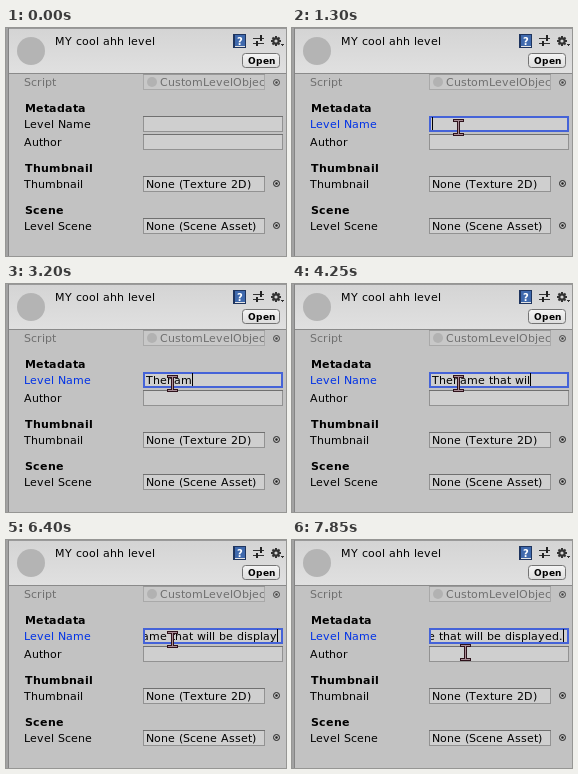
These frames come from a looping animation (280x228 px, 8000 ms). An HTML page with a canvas:

```html
<!DOCTYPE html>
<html lang="en">
<head>
<meta charset="utf-8">
<title>Level inspector</title>
<style>
html, body { margin: 0; width: 100%; height: 100%; overflow: hidden; background: #c2c2c2; }
canvas { display: block; width: 280px; height: 228px; }
</style>
</head>
<body>
<canvas id="stage" width="280" height="228"></canvas>
<script>
const ctx = document.getElementById('stage').getContext('2d');
const LOOP = 8000;
const FOCUS_AT = 1300;
const FAMILY = '"DejaVu Sans", sans-serif';
const FONT = '11px ' + FAMILY;
const BOLD = 'bold ' + FONT;
const LABEL_X = 18;

// Keystrokes: time, characters ("<" is backspace)
const KEYS = [
  [1950, 'T'], [2100, 'h'], [2250, 'e'], [2400, ' '], [2850, '<'],
  [3000, 'n'], [3100, 'a'], [3200, 'm'], [3300, 'e'], [3350, ' '],
  [3550, 't'], [3600, 'h'], [3750, 'a'], [3850, 't'], [3950, ' '],
  [4000, 'w'], [4100, 'i'], [4250, 'l'], [4400, 'l'], [4500, ' '],
  [4650, 'b'], [4800, 'e'], [4950, ' '], [5200, 'd'], [5300, 'i'],
  [5350, 's'], [5500, 'p'], [5600, 'la'], [6400, 'y'], [6600, 'e'],
  [6800, 'd'], [7000, '.']
];

// Pointer: time, x, y
const MOVES = [
  [350, 33, 105], [400, 52, 103], [450, 80, 97], [500, 108, 90],
  [550, 130, 85], [650, 150, 95], [700, 162, 102], [850, 163, 96],
  [950, 166, 99], [7150, 166, 106], [7200, 166, 123], [7250, 166, 136],
  [7300, 166, 151], [7350, 158, 209], [7400, 149, 195],
  [7700, 160, 172], [7750, 172, 148], [7800, 173, 126], [7850, 173, 112]
];

function rect(x, y, w, h, color) {
  ctx.fillStyle = color;
  ctx.fillRect(x, y, w, h);
}

function disc(x, y, r, color) {
  ctx.fillStyle = color;
  ctx.beginPath();
  ctx.arc(x, y, r, 0, 7);
  ctx.fill();
}

function shade(top, bottom, from, to) {
  const g = ctx.createLinearGradient(0, top, 0, bottom);
  g.addColorStop(0, from);
  g.addColorStop(1, to);
  return g;
}

// Glyph advances snap to whole pixels
const advance = ch => Math.round(ctx.measureText(ch).width + 0.1);

function textWidth(text) {
  let w = 0;
  for (const ch of text) w += advance(ch);
  return w;
}

function label(text, x, y, color = '#000', font = FONT) {
  ctx.font = font;
  ctx.fillStyle = color;
  for (const ch of text) {
    ctx.fillText(ch, x, y);
    x += advance(ch);
  }
}

function clipped(x, y, w, h, draw) {
  ctx.save();
  ctx.beginPath();
  ctx.rect(x, y, w, h);
  ctx.clip();
  draw();
  ctx.restore();
}

function field(x, y, w, fill = '#cfcfcf', edge = '#929292', top = '#707070') {
  rect(x, y, w, 16, edge);
  rect(x, y, w, 1, top);
  rect(x + 1, y + 1, w - 2, 14, fill);
}

function picker(y, color = '#222') {
  ctx.strokeStyle = color;
  ctx.lineWidth = 1;
  ctx.beginPath();
  ctx.arc(270.5, y, 3, 0, 7);
  ctx.stroke();
  disc(270.5, y, 1.2, color);
}

function helpIcon() {
  rect(227, 6, 13, 14, '#1f355f');
  rect(229, 7, 10, 11, '#3f69ad');
  rect(229, 18, 10, 1, '#e4e4e4');
  label('?', 231, 17, '#fff', 'bold 10px ' + FAMILY);
}

function sliderIcon() {
  rect(247, 10, 11, 1, '#333');
  rect(247, 15, 11, 1, '#333');
  rect(254, 7, 2, 6, '#222');
  rect(250, 13, 2, 5, '#222');
}

function gearIcon() {
  ctx.save();
  ctx.translate(270, 13);
  for (let i = 0; i < 4; i++) {
    rect(-1, -5, 2, 10, '#333');
    ctx.rotate(Math.PI / 4);
  }
  ctx.restore();
  disc(270, 13, 3.7, '#333');
  disc(270, 13, 1.6, '#d6d6d6');
  rect(275, 16, 3, 1, '#333');
  rect(276, 17, 1, 1, '#333');
}

function openButton() {
  ctx.beginPath();
  ctx.roundRect(236.5, 25.5, 37, 14, 3);
  ctx.fillStyle = shade(26, 39, '#f4f4f4', '#dedede');
  ctx.fill();
  ctx.strokeStyle = '#747474';
  ctx.lineWidth = 1;
  ctx.stroke();
  label('Open', 242, 36, '#000', 'bold 9px ' + FAMILY);
}

function header() {
  rect(0, 0, 280, 45, shade(0, 45, '#d4d4d4', '#e0e0e0'));
  rect(0, 0, 280, 1, '#9a9a9a');
  rect(0, 45, 280, 1, '#8a8a8a');
  disc(25, 23, 14, '#b4b4b4');
  label('MY cool ahh level', 49, 17);
  helpIcon();
  sliderIcon();
  gearIcon();
  openButton();
}

function scriptRow() {
  const grey = '#6f6f6f';
  label('Script', LABEL_X, 58, grey);
  field(137, 46, 122, '#c8c8c8', '#a9a9a9', '#999');
  disc(146, 54, 5, '#b2b2b2');
  clipped(138, 46, 120, 15, () => label('CustomLevelObject', 154, 58, grey));
  picker(54.5, '#444');
}

function objectRow(name, value, y) {
  label(name, LABEL_X, y + 12);
  field(137, y, 122);
  label(value, 140, y + 12);
  picker(y + 7.5);
}

function typedText(t) {
  let text = '';
  for (const [at, keys] of KEYS) {
    if (at > t) break;
    text = keys === '<' ? text.slice(0, -1) : text + keys;
  }
  return text;
}

function nameRow(t) {
  const focused = t >= FOCUS_AT;
  label('Level Name', LABEL_X, 100, focused ? '#0032e6' : '#000');
  if (!focused) return field(137, 88, 140);

  rect(137, 88, 140, 16, '#4563d8');
  rect(139, 90, 136, 12, '#cfcfcf');
  const text = typedText(t);
  const end = 140 + textWidth(text);
  const caret = end > 273 ? 271 : end;
  clipped(139, 90, 136, 13, () => label(text, 140 + caret - end, 100));
  rect(caret, 89, 1, 13, '#000');
}

function line(points) {
  ctx.beginPath();
  points.forEach(([x, y]) => ctx.lineTo(x, y));
}

function beam(x, y) {
  const edge = '#2e121b', core = '#a88c95';
  ctx.save();
  ctx.translate(x, y);
  rect(-5, -8, 11, 3, edge);
  rect(-5, 6, 11, 3, edge);
  rect(-1, -6, 3, 13, edge);
  rect(-4, -7, 9, 1, core);
  rect(-4, 7, 9, 1, core);
  rect(0, -7, 1, 15, core);
  ctx.restore();
}

function arrow(x, y) {
  ctx.save();
  ctx.translate(x + 0.5, y + 0.5);
  line([[0, 0], [0, 13], [3, 10.5], [6, 16], [8.5, 14.5], [6, 9.5], [10.5, 9.5]]);
  ctx.closePath();
  ctx.fillStyle = '#ff9fba';
  ctx.fill();
  ctx.strokeStyle = '#7a4354';
  ctx.lineWidth = 1;
  ctx.lineJoin = 'round';
  ctx.stroke();
  ctx.restore();
}

function pointer(t) {
  const move = MOVES.filter(m => m[0] <= t).pop();
  if (!move) return;
  const [, x, y] = move;
  const overInput = x >= 137 && (y >= 88 && y < 104 || y >= 106 && y < 122);
  (overInput ? beam : arrow)(x, y);
}

function draw(t) {
  rect(0, 0, 280, 228, '#c2c2c2');
  scriptRow();
  header();
  label('Metadata', 19, 84, '#000', BOLD);
  nameRow(t);
  label('Author', LABEL_X, 118);
  field(137, 106, 140);
  label('Thumbnail', 19, 144, '#000', BOLD);
  objectRow('Thumbnail', 'None (Texture 2D)', 148);
  label('Scene', 19, 186, '#000', BOLD);
  objectRow('Level Scene', 'None (Scene Asset)', 190);
  rect(0, 0, 2, 228, '#a2a2a2');
  rect(2, 0, 1, 228, '#858585');
  pointer(t);
}

const start = performance.now();
function tick() {
  draw((performance.now() - start) % LOOP);
  requestAnimationFrame(tick);
}
tick();
</script>
</body>
</html>
```
